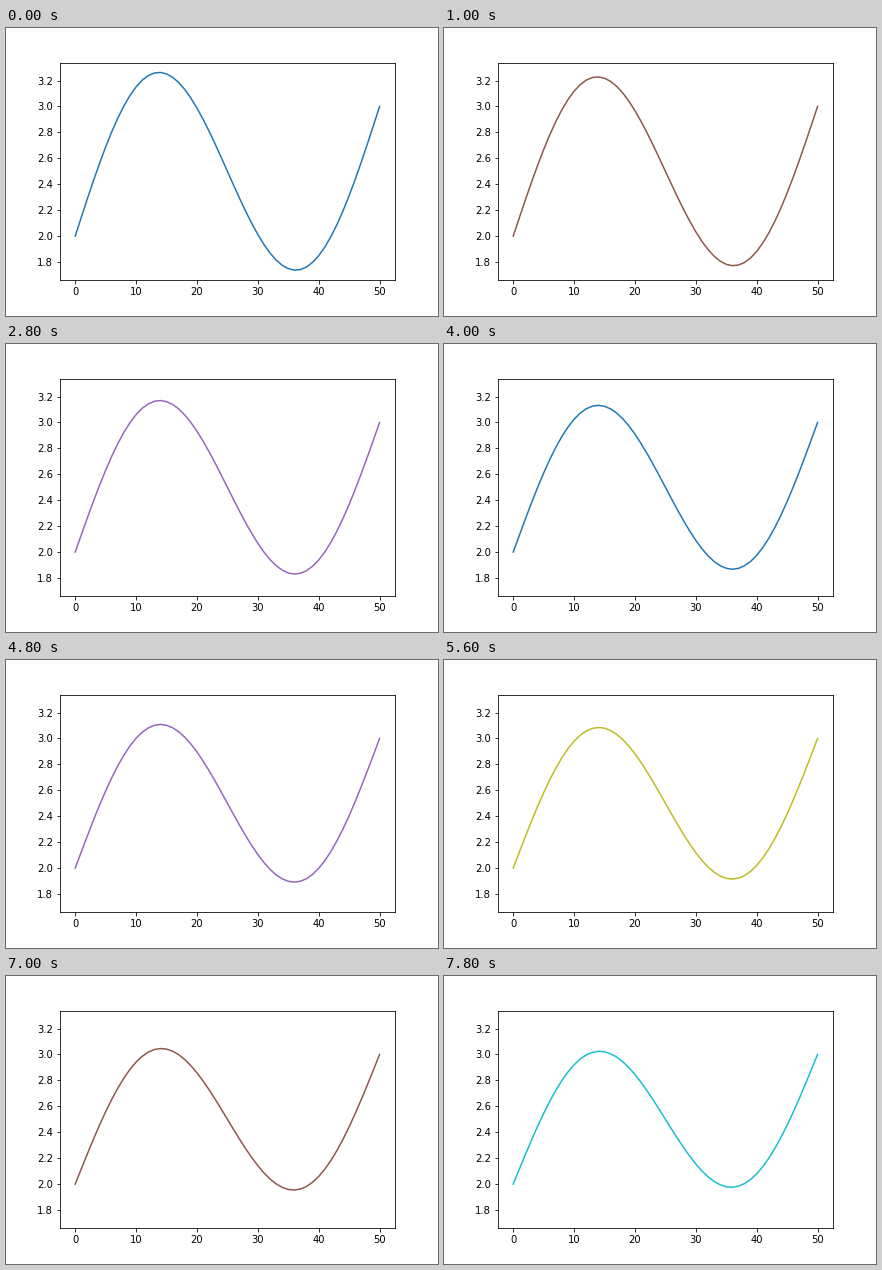
Write a matplotlib script that moves like this. It is 432x288 px and loops after 8 s.

```python
import numpy as np
import matplotlib.pyplot as plt
from matplotlib.animation import FuncAnimation

FRAMES = 40
INTERVAL = 200  # ms
N = 50          # grid cells along the rod
R = 0.45        # diffusion number of the explicit scheme

x = np.arange(N + 1)
steady = 2 + x / N
wave = np.sin(2 * np.pi * x / N)

# One explicit heat-equation step scales the sine mode by this factor.
decay = 1 - 4 * R * np.sin(np.pi / N) ** 2


def profile(step):
    return steady + decay ** step * wave


fig, ax = plt.subplots(figsize=(6, 4), dpi=72, facecolor="white")
fig.subplots_adjust(left=0.125, right=0.9, bottom=0.125, top=0.88)
line, = ax.plot(x, profile(0), color="C0", lw=1.5)
ax.set_xlim(ax.get_xlim())
ax.set_ylim(ax.get_ylim())


def update(step):
    line.set_ydata(profile(step))
    line.set_color(f"C{step % 10}")
    return line,


anim = FuncAnimation(fig, update, frames=FRAMES, interval=INTERVAL,
                     repeat=True, repeat_delay=0)
plt.show()
```
